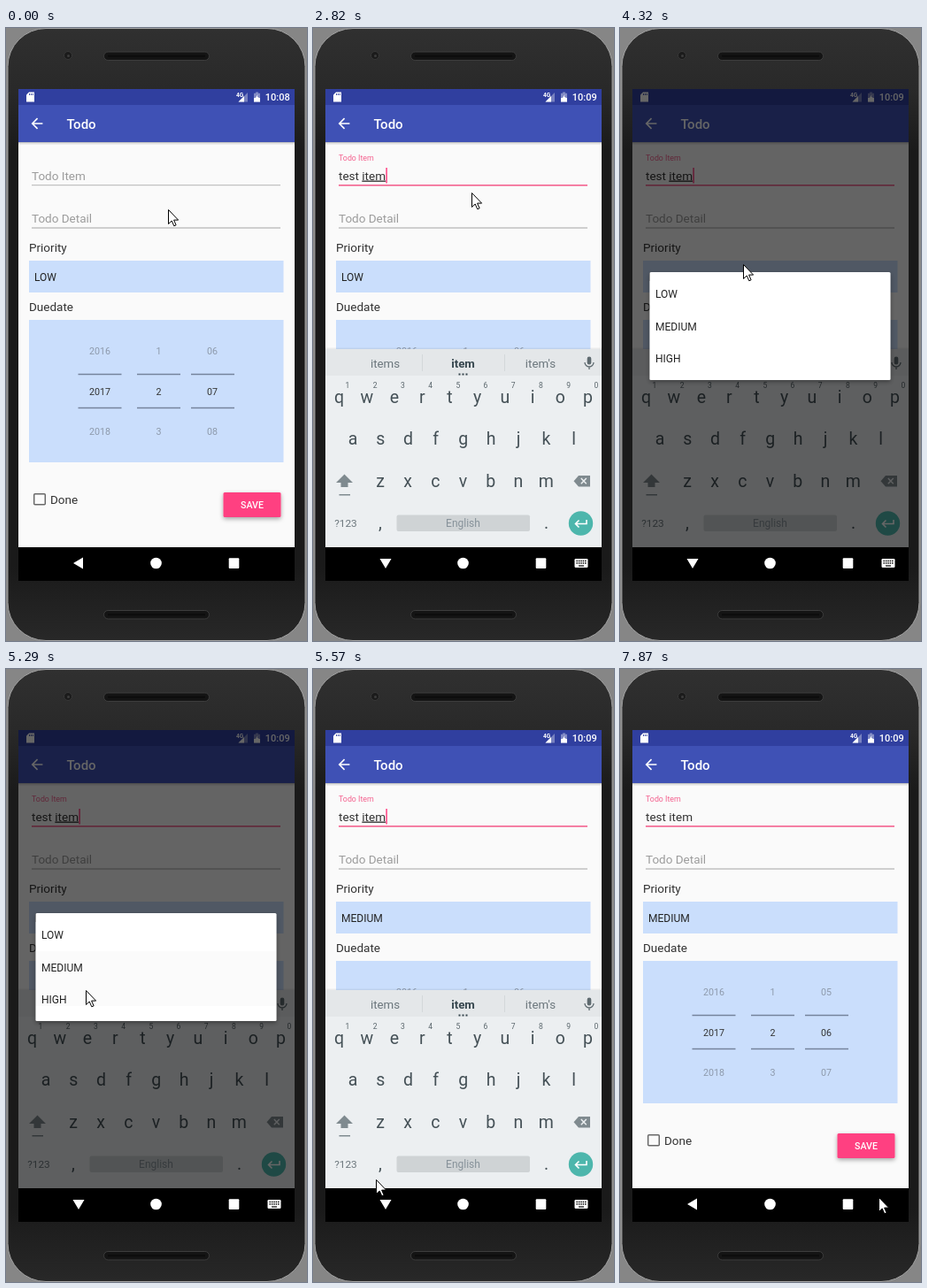
Recreate the animation shown at these times as an HTML page. Size 340x693 px, loop 8000 ms.

```html
<!DOCTYPE html>
<html lang="en">
<head>
<meta charset="utf-8">
<title>Todo form</title>
<style>
html, body { margin: 0; height: 100%; overflow: hidden; background: #868686; }
svg { display: block; width: 100vw; height: 100vh; }
text { font-family: Roboto, sans-serif; font-size: 13.5px; fill: #333; white-space: pre; }
.mid { text-anchor: middle; }
.small { font-size: 12px; fill: #222; }
.white { fill: #fff; font-weight: 500; }
.hint { fill: #9c9c9c; }
.wheel text { font-size: 10.7px; text-anchor: middle; }
.key { font-size: 19.5px; fill: #455157; text-anchor: middle; }
.digit { font-size: 8.5px; fill: #59656b; text-anchor: middle; }
.word { fill: #6b767c; text-anchor: middle; font-size: 13.3px; }
.best { fill: #37474f; font-weight: 700; }
</style>
</head>
<body>
<svg viewBox="0 0 340 693">
  <defs>
    <linearGradient id="shell" x2="0" y2="1">
      <stop stop-color="#303030"/><stop offset=".1" stop-color="#292929"/>
      <stop offset=".2" stop-color="#1a1a1a"/><stop offset=".88" stop-color="#1a1a1a"/>
      <stop offset="1" stop-color="#282828"/>
    </linearGradient>
    <filter id="shadow" x="-20%" y="-20%" width="140%" height="150%">
      <feDropShadow dx="0" dy="2" stdDeviation="2.5" flood-opacity=".35"/>
    </filter>
    <clipPath id="page"><rect x="14" y="69" width="312" height="518"/></clipPath>
    <clipPath id="dayClip"><rect x="205" y="345" width="56" height="133"/></clipPath>
  </defs>

  <!-- phone -->
  <rect x="2" y=".5" width="336" height="692" rx="43" fill="url(#shell)" stroke="#a2a2a2"/>
  <g fill="#141414" stroke="#3d3d3d">
    <rect x="110.5" y="27" width="119" height="9.5" rx="4.7"/>
    <rect x="110.5" y="658.5" width="119" height="9.5" rx="4.7"/>
  </g>
  <g fill="none" stroke="#0c0c0c" stroke-width="2"><path d="M115 31.700h110M115 663.200h110"/></g>
  <circle cx="70" cy="31" r="4.500" fill="#1b1b1b" stroke="#383838"/>
  <circle cx="70.500" cy="31.500" r="1.500" fill="#3c3c3c"/>

  <g clip-path="url(#page)">
    <rect x="14" y="69" width="312" height="518" fill="#fafafa"/>
    <rect x="14" y="129" width="312" height="1.200" fill="#000" opacity=".22"/>
    <rect x="14" y="130.200" width="312" height="1.500" fill="#000" opacity=".08"/>
    <rect x="14" y="69" width="312" height="18" fill="#303f9f"/>
    <rect x="14" y="87" width="312" height="42" fill="#3f51b5"/>

    <!-- status and app bar -->
    <path d="M26 72.500h6v11h-9v-8z" fill="#fff"/>
    <path d="M26.500 74v2M28.400 74v2M30.300 74v2" stroke="#303f9f" stroke-width=".9"/>
    <path d="M273 73v10.500h-10.500z" fill="#fff" opacity=".35"/>
    <path d="M269 77v6.500h-6.500z" fill="#fff"/>
    <text x="260" y="77.500" class="white" style="font-size:6.500px;font-weight:700">4G</text>
    <path d="M282 72.500h3v1.300h2v9.700h-7v-9.700h2z" fill="#fff" opacity=".4"/>
    <path d="M280 79h7v4.500h-7z" fill="#fff"/>
    <path d="M284.500 75l-2.600 4h1.600l-.6 3 2.600-4h-1.600z" fill="#fff"/>
    <text id="clock" x="292.800" y="82" class="white" style="font-size:11px"></text>
    <path transform="translate(25.400 98.400) scale(.8)" fill="#fff"
      d="M20 11H7.800l5.600-5.600L12 4l-8 8 8 8 1.400-1.400L7.800 13H20z"/>
    <text x="68.500" y="113.500" class="white" style="font-size:15px">Todo</text>

    <!-- form -->
    <rect id="itemLine" x="29" width="281"/>
    <text id="itemHint">Todo Item</text>
    <text id="item" x="29" y="171.500" fill="#222"></text>
    <rect id="caret" y="158" width="1.500" height="17.500" fill="#ff4081"/>
    <text x="29" y="220" class="hint">Todo Detail</text>
    <rect x="29" y="225.500" width="281" height="1" fill="#a5a5a5"/>
    <text x="26" y="253">Priority</text>
    <rect x="26" y="263" width="287.500" height="36" fill="#cadefc"/>
    <text id="priority" x="32" y="286" class="small"></text>
    <text x="26" y="320">Duedate</text>
    <rect x="26" y="330" width="287.500" height="161" fill="#cadefc"/>
    <g id="wheels" class="wheel"></g>
    <g class="wheel" clip-path="url(#dayClip)"><g id="days"></g></g>
    <path d="M81.500 391.500h49M148 391.500h49M209 391.500h49M81.500 429.500h49M148 429.500h49M209 429.500h49"
      stroke="#75839c" stroke-width="1.400"/>
    <rect x="31.700" y="526.700" width="12.600" height="12" rx="1" fill="none" stroke="#686868" stroke-width="1.500"/>
    <text x="50" y="537.700">Done</text>
    <rect x="245.500" y="525" width="65" height="28" rx="1.500" fill="#ff4081" filter="url(#shadow)"/>
    <text x="278" y="543" class="white mid" style="font-size:10.600px">SAVE</text>

    <!-- keyboard -->
    <g id="keyboard">
      <rect x="14" y="361.500" width="312" height="3" fill="#000" opacity=".06"/>
      <rect x="14" y="363" width="312" height="224" fill="#eceff1"/>
      <rect x="14" y="363" width="312" height="30" fill="#e4e7e9"/>
      <path d="M123.500 369v19M216.500 369v19" stroke="#d3d8da"/>
      <g id="words">
        <text x="81.500" y="384" class="word"></text>
        <text x="169.500" y="384" class="word best"></text>
        <text x="257" y="384" class="word"></text>
        <path d="M164.500 391.500h2M168.500 391.500h2M172.500 391.500h2" stroke="#37474f" stroke-width="1.800"/>
      </g>
      <rect x="309.700" y="371.500" width="4.600" height="9" rx="2.300" fill="#5f6b70"/>
      <path d="M307 378a5 5 0 0 0 10 0M312 383v3" fill="none" stroke="#5f6b70" stroke-width="1.300"/>
      <g id="keys"></g>
      <path d="M35.500 504.500l9.500 9.500h-5.500v5h-8v-5h-5.500zM29.500 527h12.500v1.500h-12.500z" fill="#7f8a8f"/>
      <path d="M300 506h13v12.500h-13l-5.500-6.200z" fill="#7f8a8f"/>
      <path d="M302.800 509l6 6.200M308.800 509l-6 6.200" stroke="#eceff1" stroke-width="1.500"/>
      <text x="37" y="564" class="word" style="font-size:11.800px">?123</text>
      <rect x="94.500" y="550.500" width="150.500" height="18.500" rx="2" fill="#cfd3d5"/>
      <text x="169.500" y="564" class="word" style="font-size:12px;fill:#87929a">English</text>
      <circle cx="302.500" cy="560" r="13.700" fill="#4db6ac"/>
      <path d="M309 556v4.500h-12M300.500 556.500l-4 4 4 4" fill="none" stroke="#fff" stroke-width="1.600"/>
    </g>

    <!-- priority list -->
    <rect id="dim" x="14" y="69" width="312" height="518"/>
    <g id="list">
      <rect x="33.500" y="276" width="272" height="122" rx="1.500" fill="#fff" filter="url(#shadow)"/>
      <rect id="pressed" x="33.500" y="319" width="272" height="62" fill="#000" opacity=".015"/>
      <text x="40" y="305" class="small">LOW</text>
      <text x="40" y="341.700" class="small">MEDIUM</text>
      <text x="40" y="378" class="small">HIGH</text>
    </g>
  </g>

  <!-- navigation bar -->
  <rect x="14" y="587" width="312" height="38"/>
  <g fill="#fff">
    <path id="back" d="M76 605l11-6.500v13z"/>
    <circle cx="169.500" cy="605" r="6.300"/>
    <rect x="251.700" y="599.300" width="11.600" height="11.600" rx="1"/>
    <g id="keyIcon">
      <rect x="295.500" y="600" width="15" height="10" rx="1.200"/>
      <path d="M297.500 602.500h11M297.500 605h11" stroke="#000" stroke-width="1.400" stroke-dasharray="1.400 1"/>
      <path d="M300 608h6" stroke="#000" stroke-width="1.200"/>
    </g>
  </g>
  <path id="pointer" d="M.5.500v16l3.700-3.500 2.600 5.800 2.300-1-2.500-5.700h5z" fill="#fff" stroke="#000"/>
</svg>

<script>
const LOOP = 8000, ROW = 45.5;
const el = id => document.getElementById(id);
const ramp = (t, a, b) => Math.min(1, Math.max(0, (t - a) / (b - a)));
const ease = (t, a, b) => { const u = ramp(t, a, b); return u * u * (3 - 2 * u); };
const set = (node, attrs) => { for (const k in attrs) node.setAttribute(k, attrs[k]); };
const show = (node, on) => set(node, { visibility: on ? 'visible' : 'hidden' });
const label = (x, y, s, cls = '') => `<text x="${x}" y="${y}" class="${cls}">${s}</text>`;

// Bursts of screen updates: first, last, count.
const bursts = [[0, 0, 1], [150, 1120, 8], [1240, 1540, 3], [2130, 2130, 1], [2410, 2820, 4],
  [3350, 3770, 4], [4050, 4980, 8], [5290, 6250, 8], [6400, 7360, 8], [7480, 7870, 4]];
const ticks = bursts.flatMap(([a, b, n]) =>
  Array.from({ length: n }, (_, i) => Math.floor(a + (b - a) * i / Math.max(1, n - 1))));

const typing = [[0, ''], [1120, 't'], [1240, 'te'], [1390, 'tes'], [1540, 'test'], [2130, 'test '],
  [2410, 'test i'], [2540, 'test it'], [2680, 'test ite'], [2820, 'test item']];
const guesses = [[0, ''], [1540, "tests test test's"], [2410, 'is I in'], [2540, "its it it's"],
  [2680, "items item item's"]];
const blinks = [[0, 0], [289, 1], [3350, 0], [3700, 1], [5870, 0], [6370, 1], [6870, 0], [7370, 1], [7870, 0]];
const route = [[150, 183, 205], [290, 179, 186], [3230, 179, 186], [3500, 158, 296], [3770, 139, 267],
  [4320, 139, 267], [4980, 88, 338], [5200, 88, 338], [5290, 90, 363], [5564, 71, 577], [5850, 79, 603],
  [6500, 79, 603], [7050, 236, 362], [7360, 236, 362], [7870, 292, 597]];

const latest = (list, t) => list.findLast(e => e[0] <= t)[1];

function pointerAt(t) {
  const i = route.findIndex(p => p[0] > t);
  if (i <= 0) return (i ? route.at(-1) : route[0]).slice(1);
  const [a, b] = [route[i - 1], route[i]], u = ramp(t, a[0], b[0]);
  return [1, 2].map(k => a[k] + (b[k] - a[k]) * u);
}

el('wheels').innerHTML = [[106, 2016], [172.5, 1]].map(([x, first]) => [0, 1, 2].map(i =>
  `<g opacity="${i == 1 ? 1 : .4}">${label(x, 369 + ROW * i, first + i)}</g>`).join('')).join('');
el('days').innerHTML = [0, 1, 2, 3].map(i => label(233, 369 + ROW * (i - 1), '0' + (5 + i))).join('');
el('keys').innerHTML = [['qwertyuiop', 29.6, 424], ['asdfghjkl', 45, 471], ['zxcvbnm', 76, 519]]
  .map(([row, x, y]) => [...row].map((c, i) => label(x + 31.2 * i, y, c, 'key')).join('')).join('')
  + [...'1234567890'].map((c, i) => label(39 + 31.2 * i, 407, c, 'digit')).join('')
  + label(76, 566, ',', 'key') + label(263.5, 566, '.', 'key');

function drawField(t) {
  const focused = t >= 280, up = ease(t, 200, 480);
  set(el('itemLine'), { y: focused ? 177 : 177.2, height: focused ? 1.6 : 1, fill: focused ? '#f4628f' : '#b5b5b5' });
  set(el('itemHint'), { transform: `translate(29 ${171.5 - 22 * up}) scale(${1 - .345 * up})` });
  el('itemHint').style.fill = focused ? '#f4628f' : '#9c9c9c';

  const typed = latest(typing, t), cut = typed.lastIndexOf(' ') + 1;
  const composing = t >= 1540 && t < 6400;
  const tail = typed.slice(cut);
  el('item').innerHTML = typed.slice(0, cut)
    + (composing && tail ? `<tspan text-decoration="underline">${tail}</tspan>` : tail);
  set(el('caret'), { x: 29.3 + (typed ? el('item').getComputedTextLength() : 0) });
  show(el('caret'), latest(blinks, t));

  const words = latest(guesses, t);
  show(el('words'), words);
  words.split(' ').forEach((w, i) => el('words').children[i].textContent = w);
}

function draw(now) {
  const time = now % LOOP, t = ticks.findLast(k => k <= time);
  drawField(t);
  el('clock').textContent = t < 2540 ? '10:08' : '10:09';
  el('priority').textContent = t < 5400 ? 'LOW' : 'MEDIUM';

  const raised = ease(t, 380, 720) * (1 - ease(t, 6330, 6680));
  set(el('keyboard'), { transform: `translate(0 ${228 * (1 - raised)})` });
  const open = t > 400 && t < 6400;
  set(el('back'), { transform: `rotate(${open ? -90 : 0} 82 605)` });
  show(el('keyIcon'), open);

  const fade = 1 - ramp(t, 5340, 5520);
  set(el('dim'), { opacity: .6 * ramp(t, 3900, 4125) * fade });
  set(el('list'), { opacity: t > 3900 ? fade : 0 });
  show(el('pressed'), t >= 5290);

  const shift = ROW * ease(t, 7050, 7400);
  set(el('days'), { transform: `translate(0 ${shift})` });
  [...el('days').children].forEach((day, i) =>
    set(day, { opacity: 1 - .6 * Math.min(1, Math.abs((i - 2) * ROW + shift) / ROW) }));

  set(el('pointer'), { transform: `translate(${pointerAt(t)})` });
  requestAnimationFrame(draw);
}
requestAnimationFrame(draw);
</script>
</body>
</html>
```
